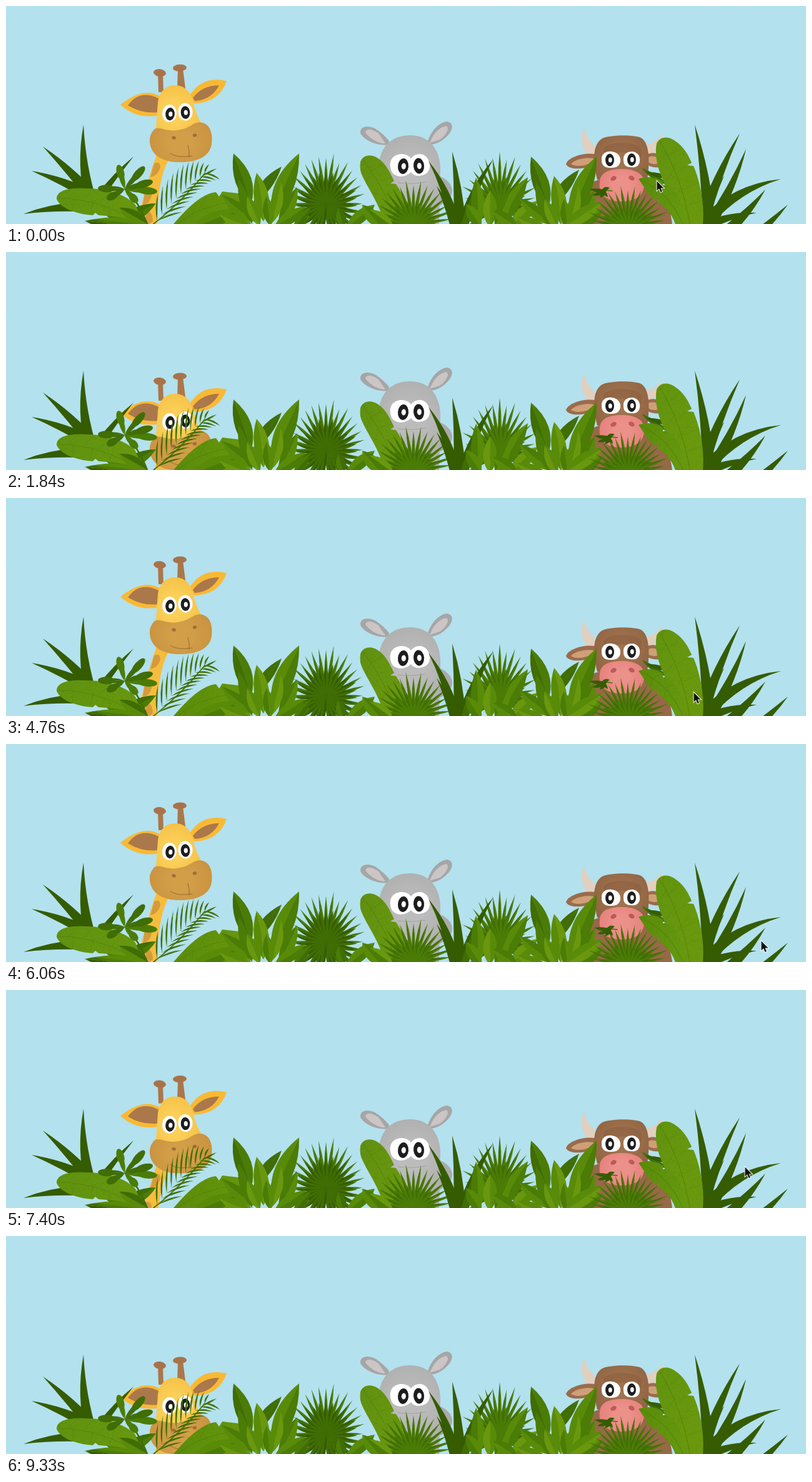
These frames come from a looping animation (1280 px wide and 349 px high, 9960 ms). An HTML page with a canvas:

```html
<!DOCTYPE html>
<html lang="en">
<head>
<meta charset="utf-8">
<title>Animals in the bushes</title>
<style>
html, body { margin: 0; width: 100%; height: 100%; overflow: hidden; background: #b3e1ee; }
canvas { display: block; width: 1280px; height: 349px; }
</style>
</head>
<body>
<canvas id="stage" width="1280" height="349"></canvas>
<script>
const W = 1280, H = 349, LOOP = 9960;
const DARK = '#355c01', DEEP = '#406d04', MID = '#4b7c06', LEAF = '#598b09', LIGHT = '#69980e';
const view = document.getElementById('stage').getContext('2d');
let g = view;

let seed = 7;
function rnd() {
  seed = (seed * 16807) % 2147483647;
  return seed / 2147483647;
}

function layer(draw) {
  const c = document.createElement('canvas');
  c.width = W;
  c.height = H;
  g = c.getContext('2d');
  draw();
  g = view;
  return c;
}

function fill(d, color) {
  g.fillStyle = color;
  g.fill(new Path2D(d));
}

function line(d, color, w = 1) {
  g.strokeStyle = color;
  g.lineWidth = w;
  g.lineCap = 'round';
  g.stroke(new Path2D(d));
}

function oval(x, y, rx, ry, color, turn = 0) {
  g.fillStyle = color;
  g.beginPath();
  g.ellipse(x, y, rx, ry, turn, 0, 7);
  g.fill();
}

function glow(x, y, r, inner, outer) {
  const s = g.createRadialGradient(x, y, r * .3, x, y, r);
  s.addColorStop(0, inner);
  s.addColorStop(1, outer);
  return s;
}

// Gives points at a share of the way from base to tip, k pixels to the right of it.
function along(x0, y0, x1, y1) {
  const dx = x1 - x0, dy = y1 - y0, len = Math.hypot(dx, dy);
  return (share, k) => [x0 + dx * share - dy / len * k, y0 + dy * share + dx / len * k];
}

// Pointed leaf, widest in the middle; positive bend bows it to the right.
function leaf(x0, y0, x1, y1, w, bend = 0, a = DARK, b = a) {
  const at = along(x0, y0, x1, y1);
  const half = (k, inner, color) => {
    g.fillStyle = color;
    g.beginPath();
    g.moveTo(x0, y0);
    g.quadraticCurveTo(...at(.45, k), x1, y1);
    g.quadraticCurveTo(...at(.45, inner), x0, y0);
    g.fill();
  };
  half(bend - w, bend + .8, a);
  half(bend + w, bend, b);
}

// Spike that is widest at its base.
function blade(x0, y0, x1, y1, w, bend = 0, color = DARK) {
  const at = along(x0, y0, x1, y1);
  g.fillStyle = color;
  g.beginPath();
  g.moveTo(...at(0, -w / 2));
  g.quadraticCurveTo(...at(.5, bend - w * .4), x1, y1);
  g.quadraticCurveTo(...at(.5, bend + w * .4), ...at(0, w / 2));
  g.fill();
}

function fan(cx, cy, rx, ry, n, from, to, w, a, b) {
  for (let i = 0; i < n; i++) {
    const t = (from + (to - from) * i / (n - 1)) * Math.PI / 180;
    const k = 1 - .06 * (i % 2) - .04 * Math.sin(i * 2.3);
    leaf(cx, cy, cx + Math.cos(t) * rx * k, cy - Math.sin(t) * ry * k, w, 0, a, b);
  }
}

function banana(d, rib, veins, a, b, box) {
  const [x, y, w, h] = box, p = new Path2D(d);
  const s = g.createLinearGradient(x, y, x + w, y + h * .3);
  s.addColorStop(0, a);
  s.addColorStop(1, b);
  g.fillStyle = s;
  g.fill(p);
  g.save();
  g.clip(p);
  for (let i = 0; i < w * h / 16; i++) {
    g.fillStyle = i % 2 ? 'rgba(60,100,0,.25)' : 'rgba(140,180,40,.2)';
    g.fillRect(x + rnd() * w, y + rnd() * h, 1, 1);
  }
  line(rib, 'rgba(75,120,8,.5)', 1.2);
  line(veins, 'rgba(60,105,5,.2)', 1);
  g.restore();
}

function bush(dx, dy) {
  g.save();
  g.translate(dx, dy);
  leaf(392, 318, 364, 236, 26, 2, DEEP, MID);
  leaf(396, 316, 441, 257, 17, -3, DEEP, DEEP);
  leaf(426, 338, 469, 236, 30, -3, LEAF, MID);
  leaf(402, 345, 345, 302, 20, -5, LEAF, MID);
  leaf(412, 345, 401, 267, 24, 4, LEAF, LIGHT);
  leaf(394, 349, 372, 277, 16, -2, MID, MID);
  leaf(424, 349, 440, 282, 20, 2, LEAF, LIGHT);
  leaf(436, 349, 466, 290, 20, 4, MID, LEAF);
  leaf(390, 352, 341, 333, 19, -3, LIGHT, LEAF);
  leaf(406, 352, 386, 304, 18, 0, LIGHT, LEAF);
  leaf(423, 352, 417, 304, 18, 0, MID, LEAF);
  leaf(430, 352, 479, 321, 20, 3, LEAF, MID);
  g.restore();
}

function eye(x, y, rx, ry, px, turn = 0) {
  oval(x, y, rx, ry, '#fff', turn);
  pupil(px, y + 1, rx * .64, ry * .73, turn);
}

function pupil(x, y, rx, ry, turn = 0) {
  oval(x, y, rx, ry, '#1d1d1d', turn);
  oval(x + .8, y, rx * .42, ry * .4, '#fff', turn);
}

function drawGiraffe() {
  fill('M241 238Q226 280 216 322L219 460H246Q232 300 259 248Z', '#f6bd3d');
  fill('M237 252Q247 248 247 258Q243 272 231 274ZM222 297Q231 292 233 303Q230 317 219 318ZM224 330Q234 326 235 345L224 352Z', '#d49a3c');
  fill('M243 108H251L252 138H244ZM275 100H283L287 132H274Z', '#aa774a');
  oval(246, 107, 10, 6, '#a8734a', .12);
  oval(278, 99, 11, 5.5, '#a8734a', -.04);
  fill('M246 144Q219 129 183 158Q209 182 246 175Z', '#f9b934');
  fill('M244 148Q214 133 195 159Q217 173 244 170Z', '#aa784a');
  fill('M294 143Q314 111 353 120Q341 155 301 156Z', '#f9b934');
  fill('M299 147Q314 127 341 127Q329 150 302 152Z', '#aa784a');
  fill('M239 208L243 154C246 135 257 127 270 127C287 127 295 138 299 151Q303 174 316 193L300 220Z',
    glow(269, 172, 52, '#fbd05a', '#f5bf43'));
  fill('M235 200C242 188 257 204 278 198C295 196 301 183 315 187C328 191 331 207 329 221C326 242 304 250 280 250C253 251 232 240 230 218Q229 208 235 200Z',
    glow(279, 219, 58, '#d29e48', '#c8913f'));
  eye(261.5, 172, 11.5, 14, 262.5, .08);
  eye(287, 169.5, 11.5, 14, 287, -.06);
  oval(268.5, 211, 3.3, 2.5, '#a36c3d', .3);
  oval(302, 207, 3.3, 2.5, '#a36c3d', -.3);
  line('M263 236Q273 244 298 240M291 223Q294 232 293 242', '#9a6a35', 1);
}

function drawRhino() {
  oval(671, 296, 43, 28, '#aaa');
  fill('M612 222C593 225 570 213 567 203C566 192 580 190 592 197Q604 205 613 216Z', '#a6a6a6');
  fill('M607 220C596 221 579 210 575 202C578 194 589 199 596 204Z', '#cbc5c6');
  fill('M674 219C681 197 694 186 706 185C717 187 715 198 708 206Q697 219 681 222Z', '#a6a6a6');
  fill('M678 219C683 205 693 194 704 192C711 195 704 207 694 214Z', '#cbc5c6');
  fill('M596 262C596 224 618 207 647 207C675 207 695 227 695 263L693 349H600Z',
    glow(647, 268, 66, '#bcbcbc', '#afafaf'));
  fill('M615 258C613 244 622 237 634 237Q644 238 648 244Q654 236 664 237C674 239 678 248 678 257C677 269 668 271 661 272Q652 272 648 266Q642 272 632 273C620 272 616 266 615 258Z', '#fff');
  pupil(635.5, 256.5, 8.5, 12.5, .08);
  pupil(660.5, 256, 8.5, 12.5, -.08);
  line('M627 283Q648 286 671 282', 'rgba(130,130,130,.45)', 1);
}

function drawCow() {
  fill('M890 349C895 300 930 274 982 274C1031 275 1061 304 1066 349Z', '#966947');
  fill('M931 238C919 225 919 208 925 195C929 207 931 216 941 221L943 237Z', '#e1d0c0');
  fill('M1024 222C1035 220 1045 214 1050 204C1050 222 1044 234 1027 239Z', '#e1d0c0');
  fill('M945 238C927 233 899 242 896 253C900 264 931 262 946 251Z', '#9b6c4b');
  fill('M940 244C924 241 907 248 904 253C913 259 930 255 940 249Z', '#cfa078');
  fill('M1024 238Q1036 232 1047 239L1047 258Q1032 260 1023 252Z', '#9b6c4b');
  fill('M1028 242Q1037 238 1045 245L1044 252Q1034 255 1027 250Z', '#cfa078');
  fill('M946 278C940 255 936 223 954 212C968 206 1004 206 1016 211C1032 220 1029 258 1026 278Z',
    glow(985, 242, 48, '#a0734f', '#916543'));
  fill('M956 228C966 216 1006 216 1016 228Q1018 238 1015 243Q985 226 956 243Z', 'rgba(127,85,56,.35)');
  fill('M953 247C952 236 961 232 969 233C979 234 984 241 983 249C981 258 975 259 966 259C958 259 953 255 953 247Z', '#fff');
  fill('M988 247C987 237 994 233 1002 233C1011 234 1015 240 1014 249C1012 258 1006 259 999 258C992 258 988 254 988 247Z', '#fff');
  pupil(966, 246.5, 7, 10);
  pupil(1001, 246, 7, 10);
  fill('M950 281C951 267 964 261 985 261C1006 261 1020 268 1021 281C1023 303 1008 313 985 313C962 313 947 303 950 281Z',
    glow(985, 286, 40, '#ec908a', '#e57f7b'));
  oval(972, 276, 5, 3.5, '#bd5a58', -.5);
  oval(1001, 275.5, 5, 3.5, '#bd5a58', .5);
}

function drawSky() {
  g.fillStyle = '#b3e1ee';
  g.fillRect(0, 0, W, H);
  g.fillStyle = 'rgba(255,255,255,.16)';
  for (let i = 0; i < 3200; i++) g.fillRect(rnd() * W | 0, rnd() * H | 0, 1, 1);
}

function drawPalm() {
  line('M236 349Q280 315 318 268', DEEP, 1.8);
  for (let i = 0; i < 11; i++) {
    const k = i / 10, x = 242 + 76 * k, y = 344 - 76 * k - 20 * k * (1 - k);
    leaf(x, y, x + 1 + 6 * k, y - 44 + 32 * k - 20 * Math.sin(k * 3), 2.8, -3, DEEP);
    leaf(x, y, x + 40 - 16 * k, y - 14 + 24 * k * k, 2.8, -4, DEEP);
  }
  leaf(314, 272, 337, 260, 3, 0, DEEP);
}

function drawSprig() {
  line('M191 293Q212 313 226 349', DEEP, 2.5);
  const tips = [[162, 309], [210, 314], [148, 292], [241, 297], [234, 281], [180, 255], [221, 258]];
  tips.forEach(([x, y], i) => {
    const dx = x - 190, dy = y - 293, color = i % 2 ? MID : DEEP;
    leaf(190, 293, 190 + dx * .9, 293 + dy * .9, 8, 0, color);
    oval(190 + dx * .7, 293 + dy * .7, Math.hypot(dx, dy) * .32, 6, color, Math.atan2(dy, dx));
  });
}

function drawFront() {
  // left clump
  blade(137, 318, 124, 190, 19, -11);
  blade(142, 310, 59, 225, 19, 5);
  blade(140, 306, 41, 264, 18, 6);
  blade(110, 322, 28, 333, 14, 5);
  blade(150, 305, 204, 241, 11, -3);
  leaf(178, 349, 240, 316, 20, 0, DEEP, MID);
  leaf(190, 352, 126, 344, 14, 0, DARK, DEEP);
  leaf(215, 352, 152, 327, 19, 0, MID, DEEP);
  banana('M216 349C190 337 173 337 148 335L143 331L139 335C112 333 87 324 81 309C81 295 100 291 125 292C157 292 190 300 207 318L220 349Z',
    'M84 308Q145 307 214 347', 'M100 307L114 293M124 309L142 293M151 313L167 299M108 308L107 328M139 312L135 332M171 321L165 336',
    '#5f9210', LIGHT, [80, 290, 145, 60]);
  leaf(233, 352, 142, 341, 15, 0, MID, LEAF);
  leaf(226, 349, 181, 323, 19, 0, LEAF, DEEP);
  drawSprig();
  drawPalm();

  banana('M268 349C284 331 309 301 336 298L341 305L346 297L372 300L392 349Z',
    'M275 349Q310 317 382 312', 'M308 328L322 302M337 317L352 299M320 324L337 348', LEAF, LIGHT, [265, 295, 130, 55]);
  leaf(295, 356, 375, 326, 24, 0, LEAF, MID);

  // middle greenery
  fan(512, 320, 64, 82, 23, -30, 210, 5.5, DEEP, MID);
  fan(512, 318, 52, 54, 27, -80, 260, 8, DARK, DEEP);
  bush(0, 0);
  leaf(460, 355, 488, 323, 14, 0, MID, DEEP);
  leaf(545, 355, 590, 318, 20, 0, LEAF, MID);
  leaf(540, 355, 532, 323, 16, 0, MID, DEEP);

  fan(790, 320, 62, 84, 21, -25, 205, 5.5, DEEP, MID);
  fan(790, 320, 48, 50, 17, -20, 200, 8, DEEP, MID);
  banana('M567 250C570 239 583 236 594 243C609 252 615 269 621 280L615 284L624 285C636 303 645 326 647 349H606C597 316 580 293 571 274Q565 263 567 250Z',
    'M570 245Q607 292 625 349', 'M585 264L602 253M598 281L617 275M610 301L631 294M583 266L578 281M597 288L588 303M609 311L600 325',
    '#608f11', LIGHT, [565, 235, 85, 114]);
  fan(652, 350, 68, 70, 19, -2, 182, 5, DEEP, MID);
  fan(652, 352, 48, 40, 15, 0, 180, 8, DEEP, MID);
  leaf(600, 354, 570, 318, 20, 0, LEAF, MID);
  leaf(620, 354, 582, 326, 18, 0, MID, LIGHT);

  blade(720, 356, 676, 248, 17, 11);
  blade(726, 356, 714, 233, 19, 5);
  blade(730, 356, 779, 246, 17, -11);
  blade(718, 356, 689, 288, 13, 5);
  blade(733, 356, 757, 284, 13, -4, DEEP);
  leaf(755, 354, 752, 275, 22, 3, MID, LEAF);
  leaf(774, 354, 775, 295, 22, 0, LIGHT, LEAF);
  leaf(790, 354, 835, 274, 24, -4, LEAF, MID);
  leaf(783, 354, 806, 300, 20, 0, MID, LEAF);
  leaf(806, 354, 850, 312, 22, 0, LIGHT, LEAF);
  leaf(760, 354, 736, 317, 20, 0, MID, LEAF);
  leaf(818, 354, 779, 328, 20, 0, LEAF, MID);
  bush(476, 5);
  leaf(893, 354, 955, 313, 22, 0, LEAF, LIGHT);

  // right clump
  fan(995, 355, 66, 66, 19, 2, 178, 5, DEEP, MID);
  fan(995, 356, 46, 36, 13, 5, 175, 8, DEEP, MID);
  leaf(1060, 286, 1017, 259, 8, -3, DEEP);
  leaf(1064, 276, 1024, 266, 7, 0, DARK);
  blade(1125, 352, 1102, 190, 20, 7);
  blade(1113, 352, 1174, 204, 19, -9);
  blade(1122, 356, 1184, 229, 18, 9);
  blade(1116, 350, 1240, 277, 20, -25);
  blade(1140, 372, 1215, 294, 20, 7);
  blade(1188, 376, 1251, 318, 15, 3);
  blade(1112, 356, 1201, 331, 16, -9);
  blade(1108, 330, 1149, 272, 13, 4);
  banana('M1041 220C1047 208 1061 208 1072 217C1085 226 1092 239 1097 251L1090 255L1100 256C1111 282 1118 318 1115 349H1071C1067 317 1057 292 1047 269Q1037 242 1041 220Z',
    'M1046 217Q1082 276 1094 349', 'M1060 241L1079 224M1073 267L1098 250M1083 294L1109 282M1089 320L1114 311M1056 236L1045 250M1069 262L1056 281M1080 291L1067 309',
    '#61930f', LIGHT, [1038, 208, 80, 141]);
  banana('M1012 277C1028 271 1042 275 1051 281L1051 287L1058 286C1076 299 1084 320 1088 349H1071C1064 330 1052 320 1041 313L1045 308L1036 309C1025 300 1021 288 1012 277Z',
    'M1015 278Q1061 298 1083 349', 'M1037 288L1050 279M1056 304L1070 298M1034 289L1032 302M1056 307L1052 321', LEAF, '#65980f', [1010, 272, 80, 77]);
}

function drawSnack(dx) {
  g.save();
  g.translate(dx, dx / 8);
  line('M950 294L970 296', DEEP, 1.5);
  leaf(962, 296, 933, 293, 6, -2);
  leaf(961, 295, 938, 303, 6, -2);
  leaf(960, 295, 950, 307, 6, -1);
  leaf(953, 295, 966, 291, 5, -1);
  leaf(956, 295, 963, 306, 5, 1);
  g.restore();
}

function drawCursor(x, y) {
  g.save();
  g.translate(x, y);
  const p = new Path2D('M.5 .5V15.5L4 12.3L6.5 18L9 17L6.5 11.4H11.5Z');
  g.lineWidth = 1.8;
  g.strokeStyle = '#fff';
  g.stroke(p);
  g.fillStyle = '#111';
  g.fill(p);
  g.restore();
}

const ramp = (t, a, b) => Math.max(0, Math.min(1, (t - a) / (b - a)));
const ease = k => k * k * (3 - 2 * k);

// Giraffe offset: down after the pointer leaves, up when it returns.
function sink(t) {
  const moves = [[1530, 1840, 1], [3830, 4280, -1], [6120, 6450, 1], [7150, 7610, -1], [9010, 9330, 1]];
  return 100 * moves.reduce((s, [a, b, way]) => s + way * ease(ramp(t, a, b)), 0);
}

// Each visit: times of arriving, resting, leaving and gone, then the three places.
const visits = [
  [0, 0, 960, 1500, 1041, 280, 1041, 280, 1282, 302],
  [3820, 4700, 5890, 6130, 1190, 308, 1100, 311, 1282, 318],
  [7110, 7610, 8740, 9010, 1278, 292, 1123, 277, 1282, 296]
];

function pointer(t) {
  const v = visits.find(v => t >= v[0] && t < v[3]);
  if (!v) return;
  const [a, b, c, d, x0, y0, x1, y1, x2, y2] = v;
  const i = b > a ? ease(ramp(t, a, b)) : 1, o = ramp(t, c, d) ** 1.5;
  drawCursor(
    Math.round(x0 + (x1 - x0) * i + (x2 - x1) * o),
    Math.round(y0 + (y1 - y0) * i + (y2 - y1) * o));
}

// Chewing: the sprig hops sideways at set moments.
function chew(t) {
  const hops = [[0, 0], [90, 4], [240, 8], [1250, 0], [1680, 4], [1840, 8], [3820, 0],
    [5000, 4], [5180, 8], [7760, 4], [8050, 0], [8320, 4], [8500, 8]];
  return hops.filter(h => h[0] <= t).pop()[1];
}

const sky = layer(drawSky);
const others = layer(() => { drawRhino(); drawCow(); });
const front = layer(drawFront);

let start;
function tick(now) {
  start ??= now;
  const t = Math.max(0, now - start) % LOOP;
  g.drawImage(sky, 0, 0);
  g.save();
  g.translate(0, sink(t));
  drawGiraffe();
  g.restore();
  g.drawImage(others, 0, 0);
  g.drawImage(front, 0, 0);
  drawSnack(chew(t));
  pointer(t);
  requestAnimationFrame(tick);
}
requestAnimationFrame(tick);
</script>
</body>
</html>
```
